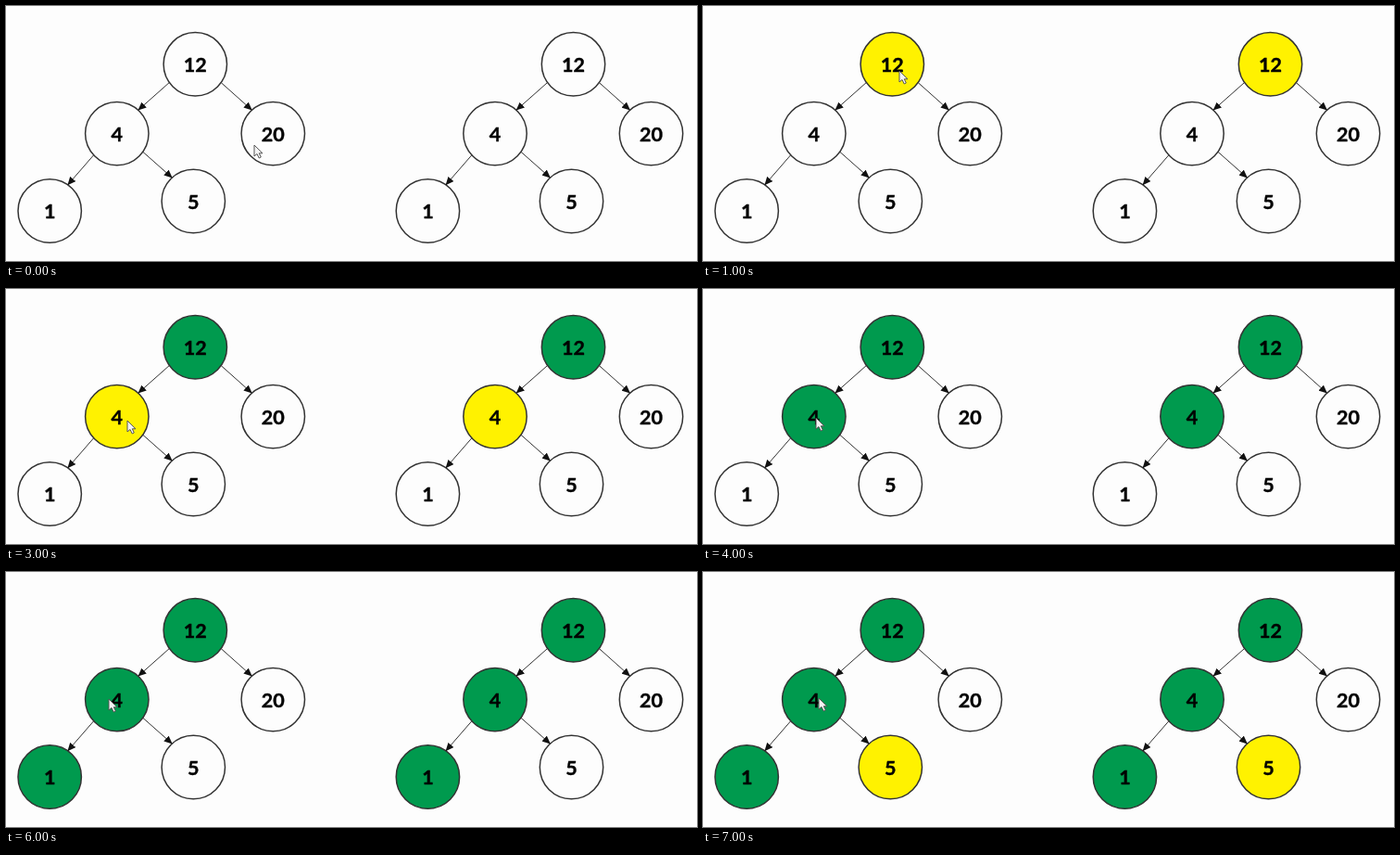
An HTML page that plays this animation: 746x275 px, repeating every 8 s.

```html
<!DOCTYPE html>
<html lang="en">
<head>
<meta charset="utf-8">
<title>Depth-first tree traversal</title>
<style>
  html, body { margin: 0; width: 100%; height: 100%; overflow: hidden; background: #fdfdfd; }
  svg { display: block; }
  text { font: bold 21.5px Lato, "Open Sans", sans-serif; text-anchor: middle; stroke: #000; stroke-width: .4; }
  circle { stroke: #333; stroke-width: 1.5; }
  line { stroke: #333; }
</style>
</head>
<body>
<svg width="746" height="275">
  <marker id="head" markerUnits="userSpaceOnUse" markerWidth="9" markerHeight="8" refX="8.5" refY="4" orient="auto">
    <path d="M0 0L9 4L0 8z" fill="#111"/>
  </marker>
  <g id="trees"></g>
  <path id="cursor" d="M0 0V12L3 9.5L5.2 14L7.3 13L5.3 8.8H9z" fill="#f4f4f4" stroke="#555"/>
</svg>
<script>
const STEP = 1000, STEPS = 8;
const RADIUS = 34.2;
const TILT = 0.11; // arrows leave and arrive slightly above the line of centres
const WHITE = '#fdfdfd', GREEN = '#009a4e', YELLOW = '#fff200';

// Listed in visiting order
const root = { label: 12, x: 204.3, y: 62.8 };
const left = { label: 4, x: 119.8, y: 137.6, parent: root };
const leaf = { label: 1, x: 47.2, y: 221, parent: left };
const inner = { label: 5, x: 202.3, y: 210.5, parent: left };
const right = { label: 20, x: 288.3, y: 137.6, parent: root };
const nodes = [root, left, leaf, inner, right];

// Where the pointer rests during each step
const stops = [
  [268, 150], [212, 70], [331, 109], [131, 142],
  [122, 139], [71, 207], [111, 137], [125, 136]
];

const rim = (node, angle) => [
  node.x + RADIUS * Math.cos(angle),
  node.y + RADIUS * Math.sin(angle)
];

function arrow(child) {
  const { parent } = child;
  if (!parent) return '';
  const angle = Math.atan2(child.y - parent.y, child.x - parent.x);
  const tilt = TILT * Math.sign(child.x - parent.x);
  const [x1, y1] = rim(parent, angle - tilt);
  const [x2, y2] = rim(child, angle + Math.PI + tilt);
  return `<line x1="${x1}" y1="${y1}" x2="${x2}" y2="${y2}" marker-end="url(#head)"/>`;
}

const disc = ({ label, x, y }) =>
  `<circle cx="${x}" cy="${y}" r="${RADIUS}"/><text x="${x}" y="${y + 8}">${label}</text>`;

const tree = dx =>
  `<g transform="translate(${dx})">${nodes.map(disc).join('')}${nodes.map(arrow).join('')}</g>`;

const trees = document.getElementById('trees');
const cursor = document.getElementById('cursor');
trees.innerHTML = tree(0) + tree(408.2);
const circles = trees.querySelectorAll('circle');

// Each node is highlighted for one step, then stays visited
function fillAt(order, step) {
  const age = step - 2 * order;
  return age < 1 ? WHITE : age < 2 ? YELLOW : GREEN;
}

function draw() {
  const step = Math.floor(performance.now() / STEP) % STEPS;
  circles.forEach((circle, i) => circle.setAttribute('fill', fillAt(i % nodes.length, step)));
  cursor.setAttribute('transform', `translate(${stops[step]})`);
  requestAnimationFrame(draw);
}
draw();
</script>
</body>
</html>
```
